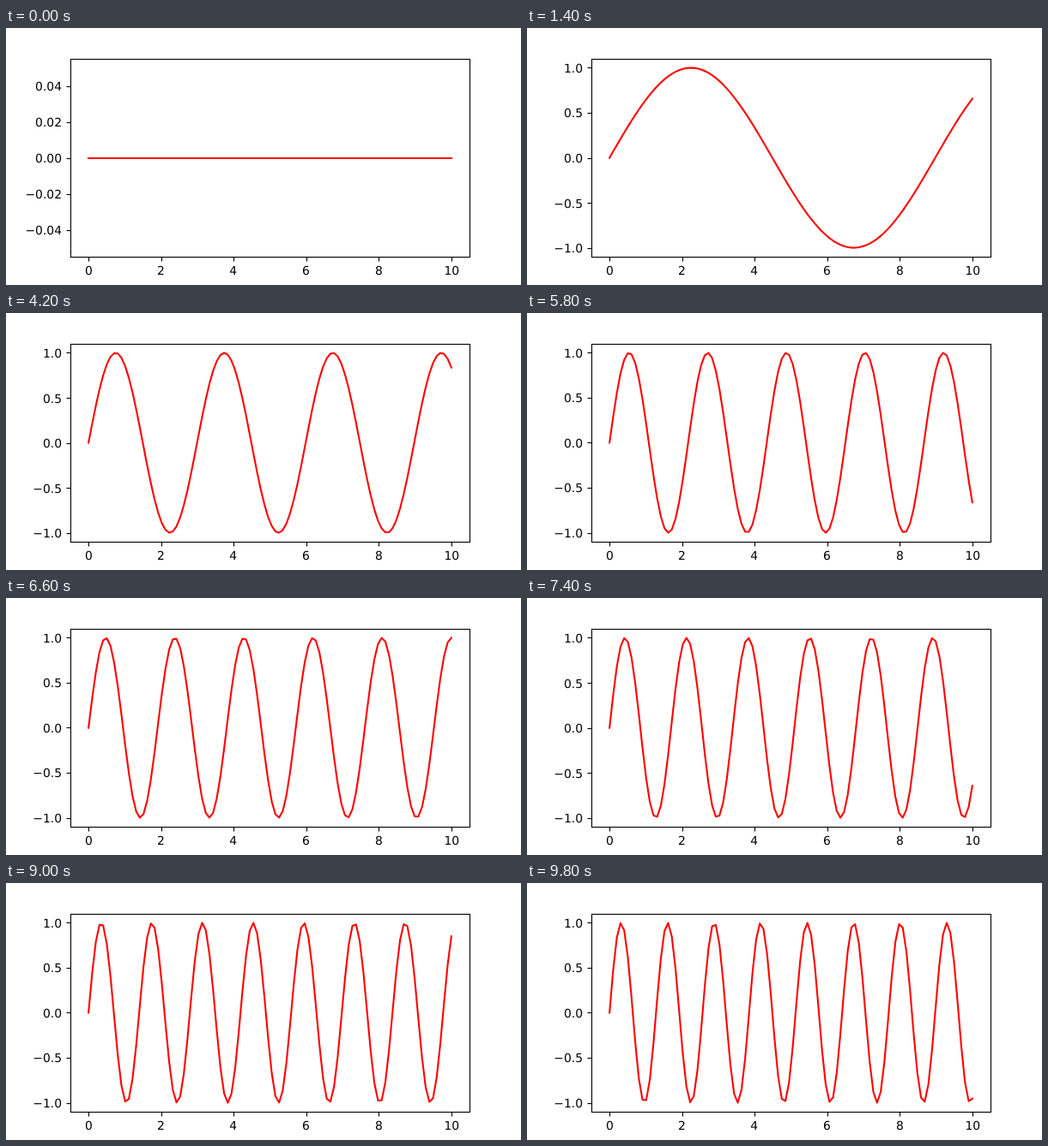
Write an HTML page that moves like this. It is 600x300 px and loops after 10000 ms.

```html
<!DOCTYPE html>
<html lang="en">
<head>
<meta charset="utf-8">
<title>Sine wave with rising frequency</title>
<style>
  html, body { margin: 0; width: 100%; height: 100%; overflow: hidden; background: #fff; }
  svg { display: block; }
  text { font: 13.889px "DejaVu Sans", sans-serif; text-rendering: geometricPrecision; }
  .axis { fill: none; stroke: #000; stroke-width: 1.111; }
  .curve { fill: none; stroke: #f00; stroke-width: 2.083; stroke-linejoin: round; stroke-linecap: square; }
</style>
</head>
<body>
<svg width="600" height="300" viewBox="0 0 600 300">
  <g id="xTicks"></g>
  <g id="yTicks"></g>
  <path id="curve" class="curve"/>
  <rect class="axis" x="75.5" y="36.5" width="465" height="231"/>
</svg>
<script>
const FRAME_MS = 200, FRAMES = 50, POINTS = 100;
const LEFT = 75, WIDTH = 465, BOTTOM = 267, HEIGHT = 231;
const byId = id => document.getElementById(id);
const snap = v => Math.floor(v + 0.5 + 1e-6);
const xPixel = x => LEFT + WIDTH * (x + 0.5) / 11;

const tick = (d, x, y, anchor, label) =>
  `<path class="axis" d="${d}"/><text x="${x}" y="${y}" text-anchor="${anchor}">${label}</text>`;

// Label centres sit on whole glyph pixels, so they differ slightly from the ticks.
const labelCentres = [96.5, 180.4, 264.75, 349.45, 434.5, 519.3];
byId('xTicks').innerHTML = labelCentres.map((centre, i) =>
  tick(`M${snap(xPixel(2 * i)) + 0.5} 267.5v5`, centre, 288, 'middle', 2 * i)).join('');

// Smallest round step that gives at most eight intervals.
function niceStep(range) {
  const raw = range / 8;
  const power = 10 ** Math.floor(Math.log10(raw));
  return power * [1, 2, 2.5, 5, 10].find(s => s * power >= raw);
}

function yTicks(low, high, yPixel) {
  const step = niceStep(high - low);
  const decimals = step < 0.1 || Math.abs(step - 0.25) < 1e-9 ? 2 : 1;
  let html = '';
  for (let i = Math.ceil(low / step); i * step <= high; i++) {
    const y = yPixel(i * step);
    const label = (i < 0 ? '\u2212' : '') + Math.abs(i * step).toFixed(decimals);
    html += tick(`M75.5 ${snap(y) + 0.5}h-5`, 65, snap(y + 5.5), 'end', label);
  }
  return html;
}

function draw(frame) {
  const xs = Array.from({ length: POINTS }, (_, i) => 10 * i / (POINTS - 1));
  const ys = xs.map(x => Math.sin(frame * x / 10));
  let low = Math.min(...ys), high = Math.max(...ys);
  if (low === high) { low -= 0.05; high += 0.05; }
  const margin = (high - low) * 0.05;
  low -= margin;
  high += margin;
  const yPixel = y => BOTTOM - HEIGHT * (y - low) / (high - low);

  byId('yTicks').innerHTML = yTicks(low, high, yPixel);
  byId('curve').setAttribute('d', frame === 0
    ? `M${snap(xPixel(0))} ${snap(yPixel(0))}H${snap(xPixel(10))}`
    : 'M' + xs.map((x, i) => `${xPixel(x).toFixed(3)} ${yPixel(ys[i]).toFixed(3)}`).join('L'));
}

let shown = -1;
function play() {
  const frame = Math.floor(performance.now() / FRAME_MS) % FRAMES;
  if (frame !== shown) draw(shown = frame);
  requestAnimationFrame(play);
}
play();
</script>
</body>
</html>
```
